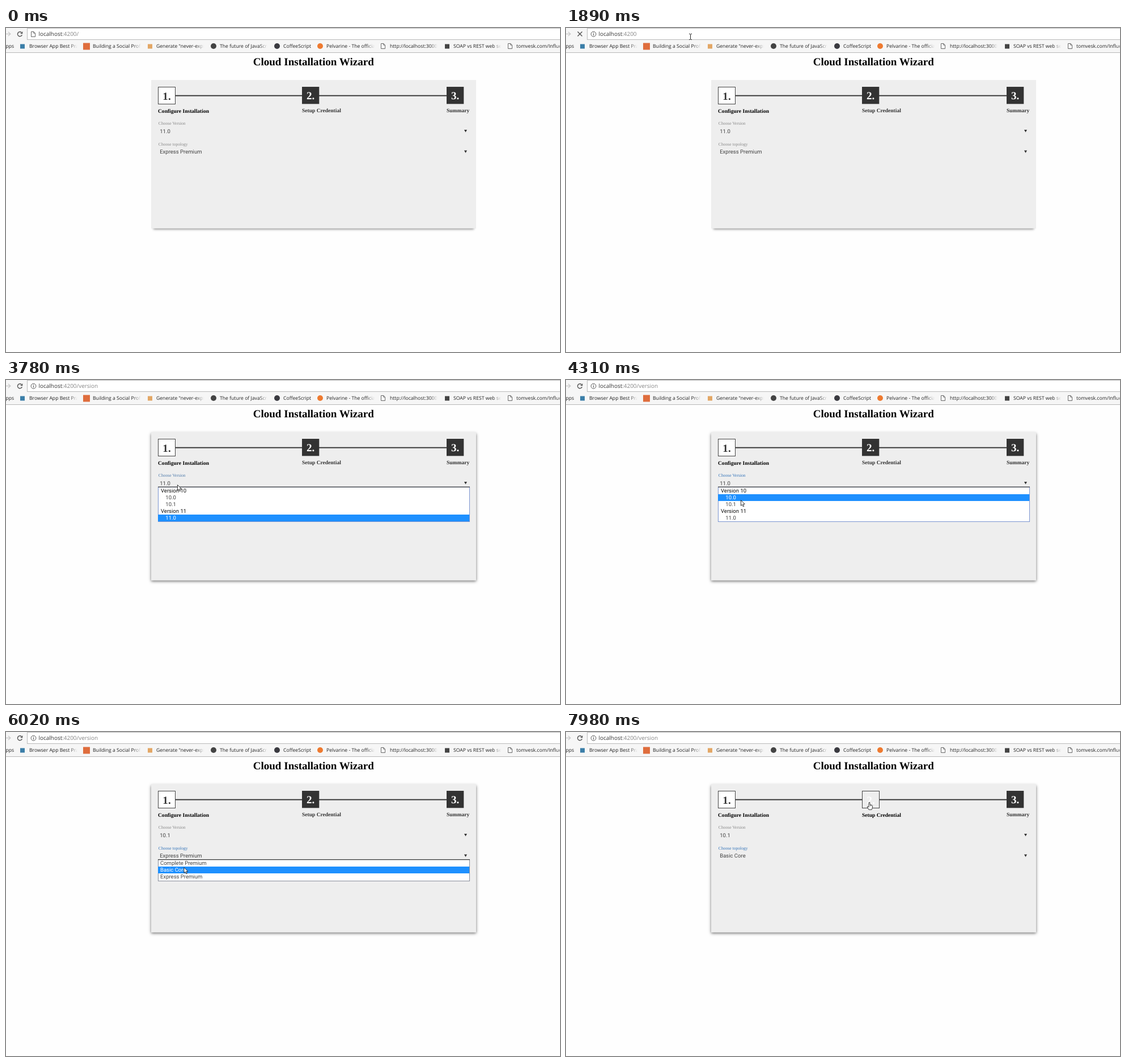
An HTML page with a canvas for the animation above (8000 ms loop, 977 by 573 pixels).

```html
<!DOCTYPE html>
<html lang="en">
<head>
<meta charset="utf-8">
<title>Cloud Installation Wizard</title>
<style>
html, body { margin: 0; width: 100%; height: 100%; overflow: hidden; background: #fefefe; }
canvas { display: block; width: 977px; height: 573px; }
</style>
</head>
<body>
<canvas id="stage"></canvas>
<script>
const W = 977, H = 573, LOOP = 8000;
const SERIF = '"Liberation Serif", serif';
const ROBOTO = 'Roboto, sans-serif';
const UI = '"Open Sans", "Noto Sans", sans-serif';
const DARK = '#333', BAR = '#f6f6f6', BLUE = '#1e90ff';

const canvas = document.getElementById('stage');
const ctx = canvas.getContext('2d');
const dpr = window.devicePixelRatio || 1;
canvas.width = W * dpr;
canvas.height = H * dpr;
ctx.textRendering = 'geometricPrecision';

// Pointer stops: time, x, y
const PATH = [
  [60, 420, 525], [890, 219, 15], [2230, 219, 15], [2370, 225, 21],
  [2530, 225, 22], [2620, 225, 22], [3070, 303, 194], [3470, 302, 185],
  [4010, 302, 185], [4310, 308, 212], [4400, 308, 212], [4630, 307, 223],
  [4860, 307.5, 224], [5570, 307.5, 224], [6020, 313.5, 239], [6580, 313.5, 239],
  [7200, 300, 183], [7450, 300, 183], [7850, 535, 124], [LOOP, 535, 124]
];

const VERSIONS = ['Version 10', '10.0', '10.1', 'Version 11', '11.0'];
const TOPOLOGIES = ['Complete Premium', 'Basic Core', 'Express Premium'];
const VERSION_Y = 182, TOPOLOGY_Y = 218.5, ROW = 12.1;

// Bookmark: icon kind, icon colour, icon centre, label, label start, label end
const BOOKMARKS = [
  ['square', '#3b7ea8', 29, 'Browser App Best Practices', 41, 126],
  ['square', '#df6d3d', 142, 'Building a Social Profile', 153, 238],
  ['square', '#e3a765', 254, 'Generate "never-expire"', 265, 349],
  ['circle', '#444', 366, 'The future of JavaScript', 377, 461],
  ['circle', '#3a3a40', 478, 'CoffeeScript', 489, 545],
  ['circle', '#ee7a30', 554, 'Pelvarine - The official', 565, 650],
  ['page', '#666', 665, 'http://localhost:3000/', 677, 761],
  ['square', '#444', 778, 'SOAP vs REST web services', 789, 873],
  ['page', '#666', 889, 'tomvesk.com/Influence', 900, 985]
];

const clamp = v => Math.max(0, Math.min(1, v));
const ramp = (t, start, length) => clamp((t - start) / length);
const ease = p => p * p * (3 - 2 * p);

function mix(a, b, p) {
  return `rgb(${a.map((v, i) => Math.round(v + (b[i] - v) * p)).join()})`;
}

function pointerAt(t) {
  let i = 1;
  while (i < PATH.length - 1 && t >= PATH[i][0]) i++;
  const [t0, x0, y0] = PATH[i - 1], [t1, x1, y1] = PATH[i];
  const p = ease(ramp(t, t0, t1 - t0));
  return { x: x0 + (x1 - x0) * p, y: y0 + (y1 - y0) * p };
}

function rect(x, y, w, h, color) {
  ctx.fillStyle = color;
  ctx.fillRect(x, y, w, h);
}

function frame(x, y, w, h, color) {
  ctx.strokeStyle = color;
  ctx.lineWidth = 1;
  ctx.strokeRect(x + .5, y + .5, w - 1, h - 1);
}

function text(s, x, y, font, color, align = 'left') {
  ctx.font = font;
  ctx.fillStyle = color;
  ctx.textAlign = align;
  ctx.fillText(s, x, y);
}

function poly(points, fill, stroke, width = 1, close = true) {
  ctx.beginPath();
  points.forEach(([x, y]) => ctx.lineTo(x, y));
  if (close) ctx.closePath();
  if (fill) { ctx.fillStyle = fill; ctx.fill(); }
  if (stroke) { ctx.strokeStyle = stroke; ctx.lineWidth = width; ctx.stroke(); }
}

function arc(x, y, r, from, to, color, width) {
  ctx.beginPath();
  ctx.arc(x, y, r, from, to);
  ctx.strokeStyle = color;
  ctx.lineWidth = width;
  ctx.stroke();
}

function pageIcon(x, y, color) {
  poly([[x - 3.5, y - 4.5], [x + .8, y - 4.5], [x + 3.5, y - 1.8], [x + 3.5, y + 4.5], [x - 3.5, y + 4.5]], '#fff', color);
  poly([[x + .8, y - 4.5], [x + .8, y - 1.8], [x + 3.5, y - 1.8]], null, color, 1, false);
}

function drawAddressBar(t) {
  const loading = t >= 1280 && t < 2140;
  rect(0, 0, W, 43, BAR);
  rect(38, 0, W, 20, '#fff');
  frame(37, 0, W, 21, '#b9b9b9');
  poly([[0, 10.5], [7.5, 10.5]], null, '#c8c8c8', 1.3, false);
  poly([[4, 7], [7.8, 10.5], [4, 14]], null, '#c8c8c8', 1.3, false);

  if (loading) {
    poly([[20.5, 6.5], [28.5, 14.5]], null, '#555', 1.5, false);
    poly([[28.5, 6.5], [20.5, 14.5]], null, '#555', 1.5, false);
  } else {
    arc(24.5, 10.8, 4, .35, 5.4, '#555', 1.5);
    poly([[29.3, 6], [29.3, 10.2], [25.1, 10.2]], '#555');
  }

  if (t < 1280) {
    pageIcon(48, 11, '#666');
  } else {
    arc(48.5, 10.8, 4.4, 0, Math.PI * 2, '#555', 1);
    rect(48, 10, 1, 3.4, '#555');
    rect(48, 8, 1, 1.2, '#555');
  }

  const font = '9.95px ' + UI;
  const path = t < 1280 ? '/' : t < 1980 ? '' : '/version';
  text('localhost', 57.5, 14.3, font, '#333');
  const w = ctx.measureText('localhost').width;
  text(':4200' + path, 57.5 + w, 14.3, font, '#858585');
}

function drawBookmarks() {
  const font = '8.65px ' + UI;
  text('pps', -.5, 35.2, font, '#222');
  for (const [kind, color, cx, label, x, end] of BOOKMARKS) {
    if (kind === 'page') {
      pageIcon(cx, 32, color);
    } else if (kind === 'circle') {
      ctx.beginPath();
      ctx.arc(cx, 32, 5, 0, Math.PI * 2);
      ctx.fillStyle = color;
      ctx.fill();
    } else {
      const s = cx === 142 ? 12 : 8;
      rect(cx - s / 2, 32.5 - s / 2, s, s, color);
    }
    ctx.save();
    ctx.beginPath();
    ctx.rect(x - 1, 24, end - x + 1, 17);
    ctx.clip();
    text(label, x, 35.2, font, '#222');
    if (label !== 'CoffeeScript') {
      const fade = ctx.createLinearGradient(end - 14, 0, end, 0);
      fade.addColorStop(0, 'rgba(246,246,246,0)');
      fade.addColorStop(1, BAR);
      rect(end - 14, 24, 14, 17, fade);
    }
    ctx.restore();
  }
  rect(0, 43, W, 1, '#b8b8b8');
}

function drawCard(hover) {
  ctx.save();
  ctx.shadowColor = hover ? 'rgba(0,0,0,.58)' : 'rgba(0,0,0,.45)';
  ctx.shadowBlur = (hover ? 5 : 4) * dpr;
  ctx.shadowOffsetY = (hover ? 2 : 2.4) * dpr;
  if (hover) rect(256, 93, 573, 261, '#eee');
  else rect(260, 100, 565, 254, '#eee');
  ctx.restore();
  rect(256, 92, 573, 262.5, '#eee');
}

function drawStep(n, x, label, open, fill, ink) {
  const size = open ? 31 : 30.3, drop = open ? 1 : 0;
  rect(x, 104, size, size, fill);
  if (open) frame(x, 104, size, size, '#444');
  text(n + '.', x + size / 2, 125.6 + drop, 'bold 19.06px ' + SERIF, ink, 'center');
  text(label, x, 149.4 + drop, 'bold 9.53px ' + SERIF, open ? '#000' : DARK);
}

function drawSteps(t) {
  const p = ramp(t, 7790, 170);
  rect(290, 118.7, 500, 1.9, DARK);
  drawStep(1, 268, 'Configure Installation', true, '#fff', DARK);
  drawStep(2, 522, 'Setup Credential', p > 0, mix([51, 51, 51], [238, 238, 238], p), '#fff');
  drawStep(3, 777, 'Summary', false, DARK, '#fff');
}

function drawSelect(y, label, value, focus) {
  text(label, 268.8, y - 10.8, '7.62px ' + SERIF, mix([136, 136, 136], [50, 115, 185], focus));
  text(value, 271.2, y + 3.5, '9.53px ' + ROBOTO, '#444');
  poly([[808, y - 2], [813, y - 2], [810.5, y + 2.4]], DARK);
}

function drawList(selectY, items, active, border) {
  const edge = selectY + 7.2;
  const top = Math.floor(edge);
  const h = Math.round(edge + items.length * ROW + 1.6) - top;
  rect(268, top, 550, h, '#fff');
  frame(268, top, 550, h, border);
  rect(268, selectY + 6.6, 550, 1.2, DARK);
  items.forEach((item, i) => {
    const y = Math.floor(edge + .8 + i * ROW);
    const group = item.startsWith('Version');
    if (i === active) rect(268, y, 549, 12, BLUE);
    const x = group ? 273 : items === VERSIONS ? 281.3 : 272;
    text(item, x, y + 9.2, '9.53px ' + ROBOTO, i === active ? '#fff' : group ? '#111' : '#444');
  });
}

function drawForm(t) {
  if (t >= 1980 && t < 2060) return;
  const topologyFocus = ramp(t, 5600, 350);
  const versionFocus = ramp(t, 3500, 400) * (1 - topologyFocus);
  drawSelect(VERSION_Y, 'Choose Version', t < 5180 ? '11.0' : '10.1', versionFocus);
  drawSelect(TOPOLOGY_Y, 'Choose topology', t < 6650 ? 'Express Premium' : 'Basic Core', topologyFocus);
  if (t >= 3540 && t < 5180) {
    drawList(VERSION_Y, VERSIONS, t < 4200 ? 4 : t < 4480 ? 1 : 2, '#7b95d0');
  }
  if (t >= 5640 && t < 6650) {
    drawList(TOPOLOGY_Y, TOPOLOGIES, t < 5980 ? 2 : 1, '#8a8f9c');
  }
}

function drawArrow() {
  poly([[.5, .5], [.5, 10.3], [2.7, 8.3], [4.3, 11.9], [5.9, 11.2], [4.3, 7.7], [7.3, 7.5]], '#fff', '#222', .9);
}

function drawBeam() {
  rect(0, -4, 1, 9, '#222');
  rect(-2, -5, 2, 1, '#222');
  rect(1, -5, 2, 1, '#222');
  rect(-2, 5, 2, 1, '#222');
  rect(1, 5, 2, 1, '#222');
}

function drawHand() {
  poly([[-1, 1], [0, .2], [1, 1], [1, 4.6], [4.6, 5.4], [5.6, 6.6], [5.2, 10.5], [4, 13.4],
    [-1, 13.4], [-3.6, 9], [-3.4, 7.8], [-2.2, 7.8], [-1, 9]], '#fff', '#222', .9);
  poly([[1.4, 5], [1.4, 7.2]], null, '#222', .7, false);
  poly([[3.3, 5.4], [3.3, 7.3]], null, '#222', .7, false);
}

function drawPointer({ x, y }, t) {
  if (t < 120) return;
  ctx.save();
  ctx.translate(x, y);
  if (y < 20) drawBeam();
  else if (t >= 7790) drawHand();
  else drawArrow();
  ctx.restore();
}

function draw(t) {
  const pointer = pointerAt(t);
  const hover = pointer.x > 256 && pointer.x < 829 && pointer.y > 92 && pointer.y < 354;
  ctx.setTransform(dpr, 0, 0, dpr, 0, 0);
  rect(0, 0, W, H, '#fefefe');
  drawAddressBar(t);
  drawBookmarks();
  text('Cloud Installation Wizard', 435.7, 66.4, 'bold 19.06px ' + SERIF, '#000');
  drawCard(hover);
  drawSteps(t);
  drawForm(t);
  drawPointer(pointer, t);
}

const start = performance.now();
function tick() {
  draw((performance.now() - start) % LOOP);
  requestAnimationFrame(tick);
}
tick();
</script>
</body>
</html>
```
